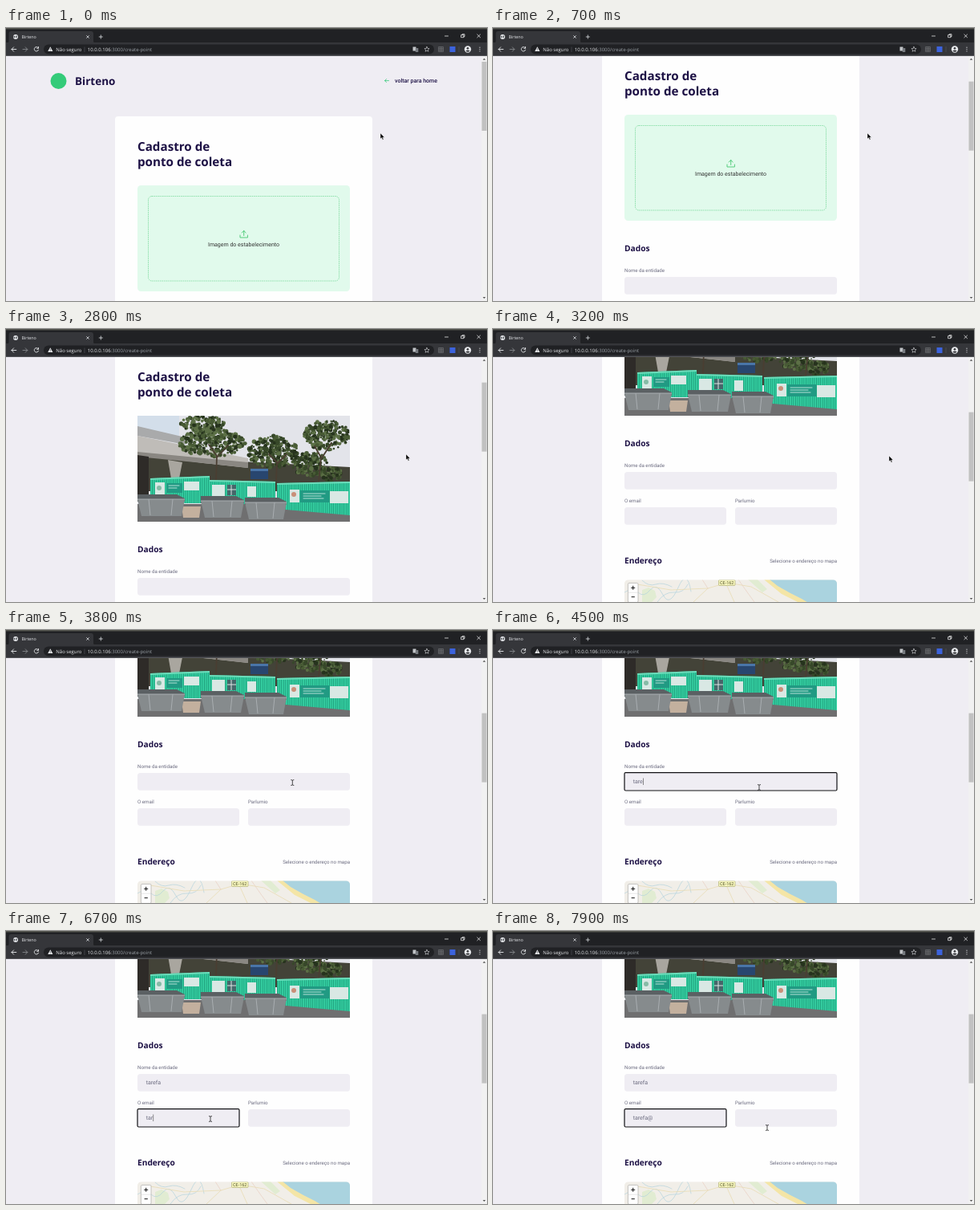
An HTML page that plays this animation: 600x340 px, repeating every 8000 ms.

```html
<!DOCTYPE html>
<html lang="pt">
<head>
<meta charset="utf-8">
<title>Cadastro</title>
<style>
html, body { margin: 0; width: 100%; height: 100%; overflow: hidden; background: #efedf3; }
svg { display: block; width: 600px; height: 340px; text-rendering: geometricPrecision; }
text { font-family: Roboto, sans-serif; font-size: 7.03px; white-space: pre; }
.h { font-family: "Noto Sans", sans-serif; font-weight: 700; fill: #1d1145; font-size: 10.2px; }
.title { font-size: 15.2px; }
.ui { font-family: "Open Sans", sans-serif; font-size: 6px; fill: #e8eaed; }
.label { font-size: 6.15px; fill: #6c6c80; }
.value { fill: #6c6c80; }
.line { fill: none; stroke-linecap: round; stroke-linejoin: round; }
</style>
</head>
<body>
<svg viewBox="0 0 600 340">
  <defs>
    <clipPath id="photoClip"><rect x="164" y="108" width="265" height="132"/></clipPath>
    <clipPath id="mapClip"><rect x="164" y="532.5" width="265" height="80" rx="4.5"/></clipPath>
    <pattern id="ribs" width="2.6" height="8" patternUnits="userSpaceOnUse">
      <rect width="2.6" height="8" fill="#35cfa2"/><rect width=".9" height="8" fill="#1f9f7c"/>
    </pattern>
  </defs>

  <rect width="600" height="340" fill="#efedf3"/>

  <g id="page">
    <circle cx="65.5" cy="66" r="10" fill="#34cb79"/>
    <text class="h" x="86" y="70.6" style="font-size:13.5px">Birteno</text>
    <path class="line" d="M477.5 65.6h-5m2-2l-2 2 2 2" stroke="#34cb79" stroke-width=".8"/>
    <text x="485" y="68" fill="#1d1145" font-weight="500">voltar para home</text>

    <rect x="136" y="110" width="321" height="700" rx="4" fill="#fefefe"/>
    <text class="h title" x="164" y="153">Cadastro de</text>
    <text class="h title" x="164" y="171.5">ponto de coleta</text>

    <g id="drop">
      <rect x="164" y="196" width="265" height="132" rx="4.5" fill="#e1faec"/>
      <rect x="177.5" y="209.5" width="238" height="105.5" rx="4.5" fill="none" stroke="#4ecb79" stroke-width=".6" stroke-dasharray="1.4 1"/>
      <path class="line" d="M292 258v3h9.4v-3M296.7 258.5v-6m-2.5 2.5l2.5-2.5 2.5 2.5" stroke="#4ecb79" stroke-width=".95"/>
      <text x="296.5" y="271.7" text-anchor="middle" fill="#333">Imagem do estabelecimento</text>
    </g>

    <g id="photo" transform="translate(0 88)" clip-path="url(#photoClip)">
      <rect x="164" y="108" width="265" height="132" fill="#e3e4ea"/>
      <path d="M164 108h52v26l-52-12z" fill="#d3deea"/>
      <path d="M164 155l90 8 175 9v30H164z" fill="#434338"/>
      <path d="M164 121l60 14v9l-60-11z" fill="#a9aaab"/>
      <path d="M164 133l138 28v12l-56-6-82-11z" fill="#bfbcb8"/>
      <path d="M164 153l138 13v7l-56-6-82-8z" fill="#8a8782"/>
      <path d="M164 157l14 2v49h-14z" fill="#2e2b28"/>
      <path d="M202 163l18 3-4 20h-10z" fill="#a9a69f"/>
      <g id="leaves"></g>
      <path class="line" d="M262 188l1-30-10-14m10 16l14-15M337 188l1-22-10-10m10 12l12-12M390 190l3-30-8-14m8 16l13-20" stroke="#4a3e32" stroke-width="1.8"/>
      <path d="M305 174h22v13h-22z" fill="#28466f"/>
      <path d="M305 174h22v3h-22z" fill="#4a75a8"/>
      <path d="M164 218h265v22H164z" fill="#6f6f70"/>
      <path d="M180 186l74-3v34h-74zM254 188l82 2v28h-82zM338 192l91-2v42l-91-8z" fill="url(#ribs)"/>
      <path d="M180 186l74-3v2l-74 3zM254 188l82 2v2l-82-2zM338 192l91-2v2l-91 2z" fill="#6bdcba"/>
      <path d="M186 191h12v15h-12zM222 190h19v11h-19zM257 194h16v15h-16zM301 196h11v13h-11zM354 200h12v16h-12zM404 202h23v15h-23z" fill="#d9e8e4"/>
      <path d="M200 192h20v12h-20zM367 201h36v15h-36z" fill="#219a83"/>
      <path class="line" d="M203 195h13m-13 3h10M371 205h27m-27 3h22m-22 3h25" stroke="#d9f0ea" stroke-width=".8"/>
      <path d="M276 194h11v13h-11z" fill="#46666a"/>
      <path d="M281 194v13m-5-7h11" stroke="#dce5e3"/>
      <circle cx="359" cy="206" r="3" fill="#c98f78"/><circle cx="191" cy="198" r="3" fill="#85bba6"/>
      <path d="M219 221h24l-2 14h-20z" fill="#c3b09e"/>
      <g id="bins"></g>
    </g>

    <text class="h" x="164" y="366">Dados</text>
    <text class="label" x="164" y="392.2">Nome da entidade</text>
    <text class="label" x="164" y="436.2">O email</text>
    <text class="label" x="302" y="436.2">Parlumio</text>
    <g id="fields"></g>
    <rect id="focus" fill="none" stroke="#101014" stroke-width="1.2" rx="1.5" height="22.4"/>
    <text class="value" id="name" x="174.7" y="411.2"></text>
    <text class="value" id="email" x="174.7" y="455.2"></text>
    <rect id="caret" width=".6" height="8.5" fill="#444"/>

    <text class="h" x="164" y="512">Endereço</text>
    <text class="label" x="429" y="511" text-anchor="end">Selecione o endereço no mapa</text>
    <g clip-path="url(#mapClip)">
      <rect x="164" y="532" width="265" height="80" fill="#f1eee8"/>
      <path d="M186 545l8-3 8 4 2 8-8 8h-10zM318 532h12l12 12-6 4z" fill="#e1ecd2"/>
      <path d="M338 532h8l24 14 26 16h-12l-24-12z" fill="#f4e5a6"/>
      <path d="M345 532l10 8 16 9 14 7 10 6h36v-30z" fill="#aad3df"/>
      <path class="line" d="M164 548q10-7 17 0t15-3 16 6 19-9 16 5M205 560q9-13 21-12t17-10M186 533q8 8 17 5t20 3" stroke="#b3d3dd" stroke-width=".7"/>
      <path class="line" d="M250 560l18-17 24-7 30 5 34 19M292 540l9 20M180 538l42 7 46-2" stroke="#e9dcb4" stroke-width=".8"/>
      <path class="line" d="M306 532l12 17 8 11M261 532l7 11" stroke="#e9cfc2" stroke-width=".7"/>
      <rect x="281.5" y="532.5" width="20.5" height="7" rx="1" fill="#f7f6bd" stroke="#a5a46a" stroke-width=".6"/>
      <text x="291.7" y="538.1" text-anchor="middle" style="font-size:5.5px" fill="#55552f">CE-162</text>
      <rect x="168.4" y="536.4" width="12.6" height="24" rx="1.5" fill="#fff" stroke="#b6b5b2" stroke-width=".8"/>
      <path d="M168.4 548.2h12.6" stroke="#ccc" stroke-width=".5"/>
      <path d="M172.2 542.3h5m-2.5-2.5v5M172.6 553.7h4.2" stroke="#111"/>
    </g>
  </g>

  <rect x="593" y="35" width="7" height="305" fill="#f1f1f1"/>
  <path d="M594.7 39.8l1.8-2 1.8 2zM594.7 335l1.8 2 1.8-2z" fill="#555"/>
  <rect id="thumb" x="593.5" width="6" height="86" fill="#c1c1c1"/>

  <rect id="frame" width="600" height="19"/>
  <rect width="600" height="1.5" fill="#55564f"/>
  <path d="M1 18.5q2.5 0 2.5-2.500V7q0-3 3-3H106q3 0 3 3v9q0 2.500 2.500 2.500z" fill="#35363a"/>
  <rect y="18" width="600" height="17" fill="#35363a"/>
  <rect y="34" width="600" height="1" fill="#54565a"/>
  <circle cx="12" cy="11" r="3" fill="#e8eaed"/>
  <path d="M9.7 9.500l2 1-1 2-1.300-1zM12.800 9l1.300 1.200-1 2.500-1-1z" fill="#55585c"/>
  <text class="ui" x="19.500" y="13" style="font-size:5.300px">Birteno</text>
  <path d="M100.300 9.300l3.400 3.400m0-3.400l-3.400 3.400M115.800 11h5m-2.500-2.500v5" stroke="#dadce0" stroke-width=".8"/>
  <path id="controls" class="line" d="M547.500 10h4M568 8.700h3v3h-3zM569 8.700v-1h3v3h-1M587.800 8l3.800 3.800m0-3.800l-3.800 3.800" stroke-width=".7"/>

  <rect x="47" y="20.500" width="487" height="12" rx="6" fill="#202124"/>
  <path class="line" d="M12.800 26.500H7m2.600-2.700L7 26.500l2.600 2.700M40.200 24.700A2.700 2.700 0 1 0 40.500 27.300M40.500 23.500v1.800h-1.800" stroke="#e8eaed" stroke-width=".9"/>
  <path class="line" d="M21 26.500h5.800m-2.600-2.700l2.600 2.700-2.600 2.700" stroke="#84878b" stroke-width=".9"/>
  <path d="M55.300 23.300l3.100 5.700h-6.200z" fill="#e8eaed"/>
  <path d="M55.300 25.200v1.800m0 .6v.7" stroke="#202124" stroke-width=".6"/>
  <text class="ui" x="62.300" y="28.700">Não seguro</text>
  <path d="M98 23.500v6.500" stroke="#5f6368" stroke-width=".5"/>
  <text class="ui" x="101.800" y="28.700">10.0.0.106<tspan fill="#9aa0a6">:3000/create-point</tspan></text>
  <path d="M507.500 23.500h4v5h-4z" fill="#c4c7ca"/>
  <path d="M510.800 25h3.500v5h-3.500z" fill="#777b80"/>
  <path class="line" d="M525 23.300l.9 2.100 2.200.2-1.700 1.500.5 2.200-1.900-1.200-1.900 1.200.5-2.200-1.700-1.500 2.200-.2z" stroke="#dadce0" stroke-width=".6"/>
  <path d="M539.500 23.500h6v6h-6zm2 0v6m2-6v6m-4-4h6m-6 2h6" fill="none" stroke="#77797d" stroke-width=".6"/>
  <rect x="553.500" y="23" width="7" height="7" fill="#3c63dd"/>
  <path d="M565 23v7" stroke="#5f6368" stroke-width=".5"/>
  <circle cx="576" cy="26.500" r="4.200" fill="#e8eaed"/>
  <circle cx="576" cy="25.300" r="1.300" fill="#35363a"/>
  <path d="M573.400 28.700q2.600-2.400 5.200 0-2.600 2-5.200 0z" fill="#35363a"/>
  <path class="line" d="M591 24.200v0m0 2.300v0m0 2.300v0" stroke="#e8eaed" stroke-width="1.200"/>

  <path id="arrow" d="M0 0v7.100l1.600-1.500 1.200 2.700 1.200-.5-1.200-2.600h2.300z" fill="#000" stroke="#fff" stroke-width=".4"/>
  <path id="beam" class="line" d="M-1.600-3.400q1.600 0 1.600.7 0-.7 1.600-.7M0-2.700v5.400M-1.600 3.400q1.600 0 1.600-.7 0 .7 1.600.7" stroke="#222" stroke-width=".8"/>
</svg>
<script>
const $ = id => document.getElementById(id);
const set = (id, attrs) => { for (const k in attrs) $(id).setAttribute(k, attrs[k]); };
const show = (id, on) => { $(id).style.display = on ? '' : 'none'; };

// Form fields in page coordinates: x, y, width
const fields = [[164, 398, 265], [164, 442, 127], [302, 442, 127]];
$('fields').innerHTML = fields.map(([x, y, w]) =>
  `<rect x="${x}" y="${y}" width="${w}" height="21.7" rx="3.5" fill="#efedf3"/>`).join('');

let seed = 7;
const rand = () => (seed = seed * 16807 % 2147483647) / 2147483647;

// Tree crowns: centre, radii, number of leaf clumps
const crowns = [[257, 142, 42, 17, 330], [246, 118, 28, 10, 160], [333, 153, 31, 20, 300],
  [379, 168, 22, 15, 170], [400, 132, 28, 19, 260], [405, 180, 14, 9, 70]];
const greens = ['#26331d', '#374829', '#485b35', '#5c7046'];
$('leaves').innerHTML = crowns.map(([cx, cy, rx, ry, n]) =>
  Array.from({ length: n }, () => {
    const a = rand() * 2 * Math.PI, d = Math.sqrt(rand());
    const x = cx + rx * d * Math.cos(a), y = cy + ry * d * Math.sin(a);
    return `<circle cx="${x.toFixed(1)}" cy="${y.toFixed(1)}" r="${(.8 + rand() * 2).toFixed(1)}" fill="${greens[rand() * 4 | 0]}"/>`;
  }).join('')).join('');

$('bins').innerHTML = [[164, 206, 59], [243, 208, 54], [298, 210, 52]].map(([x, y, w]) => `
  <path d="M${x} ${y}h${w - 10}l10 5v4H${x}z" fill="#5b6063"/>
  <path d="M${x} ${y + 6}h${w}l-4 21H${x + 5}z" fill="#868b8d"/>
  <path d="M${x} ${y + 6}h${w}M${x + 14} ${y + 6}l2 20m${w - 31}-20l-2 20" fill="none" stroke="#a9aeb1"/>`).join('');

const ease = p => p * p * (3 - 2 * p);
const ramp = (t, a, b) => ease(Math.min(1, Math.max(0, (t - a) / (b - a))));

// Pointer stops: time, x, y
const stops = [[0, 467, 131], [900, 467, 131], [1200, 300, 190], [1350, 300, 190],
  [1600, 153, 82.5], [2100, 153, 82.5], [2400, 330, 285], [2500, 330, 285], [2800, 499, 156],
  [3200, 494, 158], [3500, 494, 158], [3900, 332, 196], [5100, 332, 196], [5500, 284, 216.5],
  [5800, 255, 234], [7400, 255, 234], [7800, 342, 245], [8000, 342, 245]];

function pointer(t) {
  const i = stops.findIndex(s => s[0] > t);
  const [t0, x0, y0] = stops[i - 1], [t1, x1, y1] = stops[i];
  const p = ramp(t, t0, t1);
  return [x0 + (x1 - x0) * p, y0 + (y1 - y0) * p];
}

const inputs = [
  { id: 'name', text: 'tarefa', from: 4000, to: 5800, keys: [4100, 4200, 4300, 4400, 4600, 4700] },
  { id: 'email', text: 'tarefa@', from: 5800, to: 8000, keys: [6500, 6600, 6700, 6800, 6900, 7000, 7300] }
];

function draw(t) {
  const scroll = 88 * ramp(t, 300, 700) + 132 * ramp(t, 2800, 3200);
  set('page', { transform: `translate(0 ${-scroll})` });
  set('thumb', { y: 42 + scroll * .28 });

  const active = t < 1500 || t >= 2600;
  set('frame', { fill: active ? '#202124' : '#2e2f32' });
  set('controls', { stroke: active ? '#fff' : '#777' });
  show('drop', t < 2700);
  show('photo', t >= 2700);

  show('focus', false);
  show('caret', false);
  inputs.forEach(({ id, text, from, to, keys }, i) => {
    const typed = keys.filter(k => k <= t);
    $(id).textContent = text.slice(0, typed.length);
    if (t < from || t >= to) return;
    const [x, y, w] = fields[i];
    const last = typed.length ? typed[typed.length - 1] : from;
    show('focus', true);
    set('focus', { x, y: y - .4, width: w });
    show('caret', (t - last) % 1000 < 500);
    set('caret', { x: 175 + (typed.length ? $(id).getComputedTextLength() : 0), y: y + 6.5 });
  });

  const [x, y] = pointer(t);
  const overField = fields.some(([fx, fy, w]) =>
    x > fx && x < fx + w && y + scroll > fy - 2 && y + scroll < fy + 24);
  show('arrow', !overField);
  show('beam', overField);
  set(overField ? 'beam' : 'arrow', { transform: `translate(${x} ${y})` });
}

function tick() {
  draw(Math.floor(performance.now() % 8000 / 100) * 100);
  requestAnimationFrame(tick);
}
tick();
</script>
</body>
</html>
```
